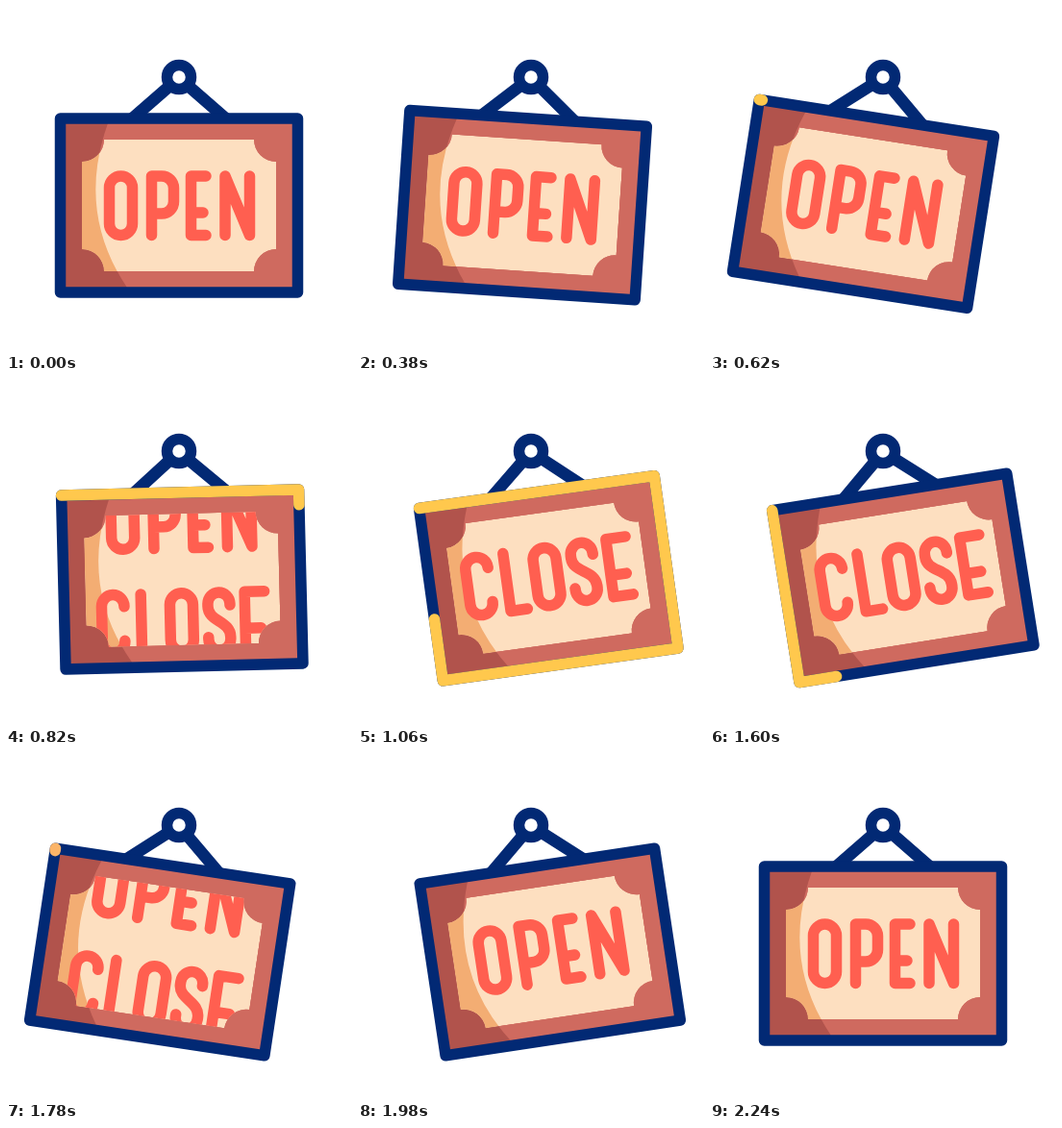
Write an HTML page that moves like this. It is 360 px wide and 360 px high and loops after 2.4 s.

```html
<!DOCTYPE html>
<html lang="en">
<head>
<meta charset="utf-8">
<title>Open and close sign</title>
<style>
html, body { margin: 0; width: 100%; height: 100%; overflow: hidden; background: #fff; }
svg { display: block; width: 100vw; height: 100vh; }
.line { fill: none; stroke: #022974; stroke-width: 11.5; stroke-linejoin: round; }
#rope { stroke-width: 12.5; }
#trim { stroke: #ffc84d; stroke-linecap: round; }
#words path { fill: none; stroke: #ff5f50; stroke-width: 11.5; stroke-linecap: round; stroke-linejoin: round; }
</style>
</head>
<body>
<svg viewBox="0 0 360 360">
  <defs>
    <path id="panel" d="M102 139H258A23 23 0 0 0 281 162V253A23 23 0 0 0 258 276H102A23 23 0 0 0 79 253V162A23 23 0 0 0 102 139Z"/>
    <path id="shade" d="M57 117H108L106 122Q73 214 126 293L130 298H57Z"/>
    <clipPath id="inside"><use href="#panel"/></clipPath>
  </defs>
  <g id="sign">
    <path class="line" id="rope" d="M131.500 117L170.500 83M228.500 117L189.500 83"/>
    <path fill="#cf6a5f" d="M57 117H303V298H57Z"/>
    <use href="#shade" fill="#b1534c"/>
    <g clip-path="url(#inside)">
      <use href="#panel" fill="#fddfc0"/>
      <use href="#shade" fill="#f3ad73"/>
      <g id="words">
        <path aria-label="OPEN" d="M107.500 189A12 12 0 0 1 131.500 189V226.500A12 12 0 0 1 107.500 226.500Z
          M151.500 238.500V177H162A12.500 12.500 0 0 1 174.500 189.500V203.500A12.500 12.500 0 0 1 162 216H151.500
          M208 177H192.500V238.500H208M192.500 215H205
          M228 238.500V177L253.500 238.500V177"/>
        <path aria-label="CLOSE" transform="translate(0 110)" d="M119 188V187.500A11.750 12 0 0 0 95.500 187.500V224A11.750 12 0 0 0 119 224V223.500
          M136.500 175.500V236H154
          M166.500 187.500A12 12 0 0 1 190.500 187.500V224A12 12 0 0 1 166.500 224Z
          M229 189V187.500A11.500 12 0 0 0 206 187.500V190C206 206 229 205 229 222V224A11.500 12 0 0 1 206 224V222
          M265 175.500H244.500V236H265M244.500 213.500H261"/>
      </g>
    </g>
    <path class="line" d="M56.500 117H303.500V298H56.500Z"/>
    <path class="line" id="trim" pathLength="1" d="M56.500 117H303.500V298H56.500V117"/>
  </g>
  <circle class="line" cx="180" cy="74" r="12.500"/>
</svg>
<script>
const LOOP = 2400;
const [sign, words, trim] = ['sign', 'words', 'trim'].map(id => document.getElementById(id));

// Keys are [time, value] pairs, eased in and out between neighbours.
const swing = [[200, 0], [600, 9], [1000, -9], [1400, 9], [1600, -9], [1800, 9], [2000, -9], [2240, 0]];
const roll = [[600, 0], [1000, -110], [1600, -110], [2000, 0]];
const trimStart = [[1200, 0], [1800, 1]];
const trimEnd = [[600, 0], [1200, 1]];

function at(keys, t) {
  if (t <= keys[0][0]) return keys[0][1];
  const i = keys.findIndex(key => key[0] > t);
  if (i < 0) return keys[keys.length - 1][1];
  const [t0, a] = keys[i - 1], [t1, b] = keys[i];
  const p = (t - t0) / (t1 - t0);
  return a + (b - a) * p * p * (3 - 2 * p);
}

function draw(t) {
  sign.setAttribute('transform', `rotate(${at(swing, t)} 180 74)`);
  words.setAttribute('transform', `translate(0 ${at(roll, t)})`);
  const start = at(trimStart, t), length = at(trimEnd, t) - start;
  trim.style.display = length > 0 ? '' : 'none';
  trim.style.stroke = start > 0.99 ? '#fbb468' : '';
  trim.style.strokeDasharray = `${length} 2`;
  trim.style.strokeDashoffset = -start;
}

const origin = performance.now();
function tick() {
  draw((performance.now() - origin) % LOOP);
  requestAnimationFrame(tick);
}
tick();
</script>
</body>
</html>
```
